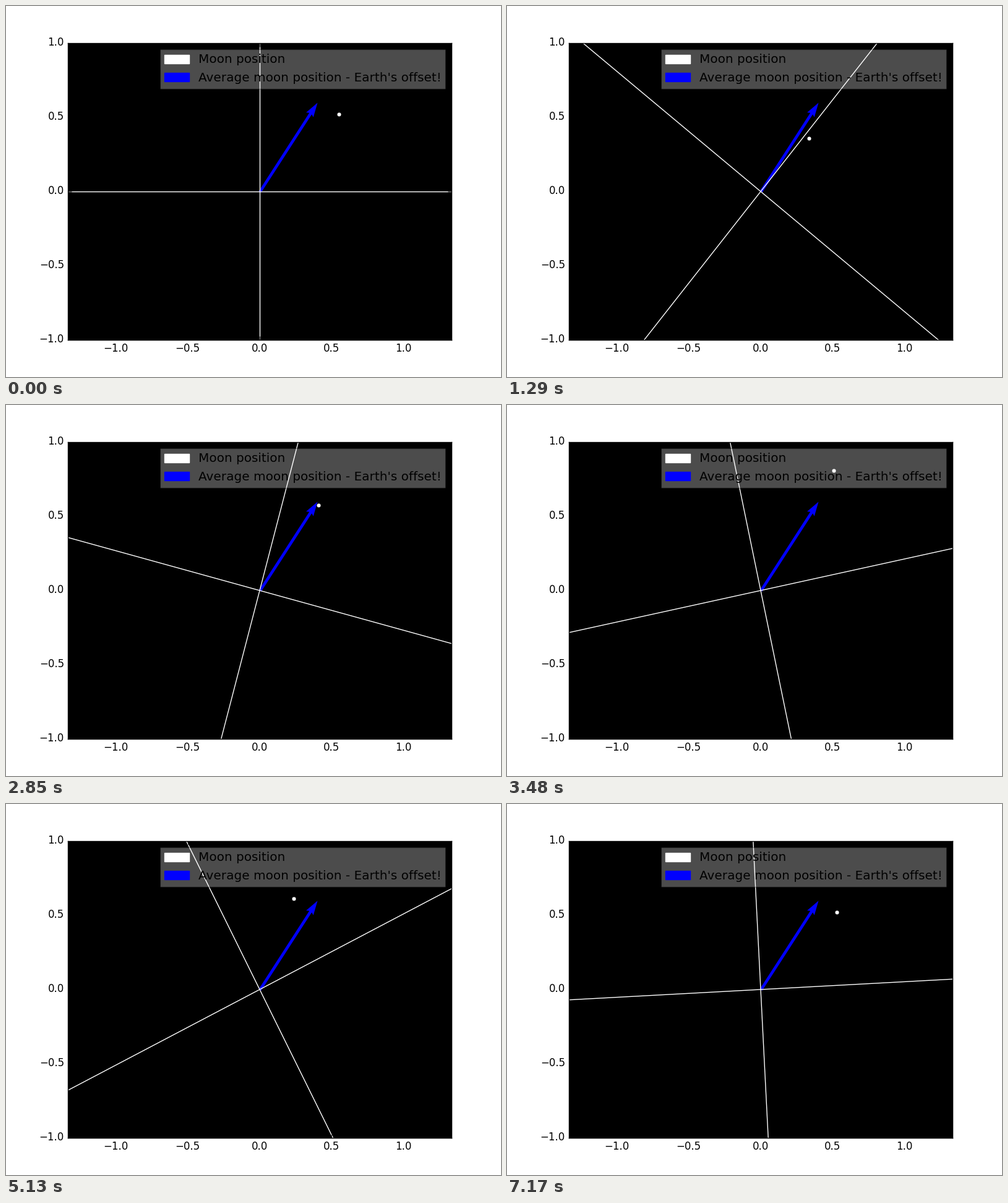
Recreate the animation shown at these times as a matplotlib script. Size 800x600 px, loop 7.2 s.

```python
import numpy as np
import matplotlib.pyplot as plt
from matplotlib.animation import FuncAnimation
from matplotlib.patches import Patch, Rectangle
from matplotlib.transforms import Affine2D, IdentityTransform

plt.style.use("classic")
plt.rcParams.update({
    "font.family": "DejaVu Sans",
    "figure.dpi": 100,
    "savefig.dpi": 100,
    "figure.facecolor": "white",
    "axes.facecolor": "black",
})

FRAMES = 240
INTERVAL = 30

# Orbit as rotating terms: complex amplitude and turns per loop
SUN, EARTH, MOON = 0.1 + 0.05j, 0.4 + 0.6j, 0.05 - 0.13j
SUN_TURNS, EARTH_TURNS, MOON_TURNS = 0, 2, 7


def spin(turns, phase):
    return np.exp(2j * np.pi * turns * phase)


def moon_at(phase):
    """Moon position seen from the frame that turns with the Earth."""
    return (EARTH
            + SUN * spin(SUN_TURNS - EARTH_TURNS, phase)
            + MOON * spin(MOON_TURNS - EARTH_TURNS, phase))


fig = plt.figure(figsize=(8, 6))
ax = fig.add_axes([0.125, 0.1, 0.775, 0.8])
ax.set_xlim(-4 / 3, 4 / 3)
ax.set_ylim(-1, 1)
ax.set_xticks(np.arange(-1, 1.1, 0.5))
ax.set_yticks(np.arange(-1, 1.1, 0.5))

ax.quiver([0], [0], [EARTH.real], [EARTH.imag], color="blue",
          angles="xy", scale_units="xy", scale=1)
axes_lines = [ax.plot([], [], color="white", lw=1)[0] for _ in range(2)]
moon, = ax.plot([], [], "wo", ms=5, zorder=2.2)

# Translucent legend panel, placed in pixels
ax.add_patch(Rectangle((249, 466), 461, 64, fc="white", ec="black",
                       alpha=0.3, zorder=4.9,
                       transform=IdentityTransform()))
legend = ax.legend(
    handles=[
        Patch(color="white", label="Moon position"),
        Patch(color="blue", label="Average moon position - Earth's offset!"),
    ],
    loc="upper right", bbox_to_anchor=(1 + 2.5 / 620, 1), frameon=False)

# Text sits on whole pixels, rounded towards the top left
nudge = Affine2D().translate(-0.5, 0.5)
for label in [*ax.get_xticklabels(), *ax.get_yticklabels(),
              *legend.get_texts()]:
    label.set_transform(label.get_transform() + nudge)


def update(i):
    phase = i / FRAMES
    for line, start in zip(axes_lines, (1, 1j)):
        tip = 2 * start * spin(-EARTH_TURNS, phase)
        line.set_data([-tip.real, tip.real], [-tip.imag, tip.imag])
    pos = moon_at(phase)
    moon.set_data([pos.real], [pos.imag])
    return [*axes_lines, moon]


anim = FuncAnimation(fig, update, frames=FRAMES, interval=INTERVAL,
                     repeat=True, repeat_delay=0, blit=False)
plt.show()
```
